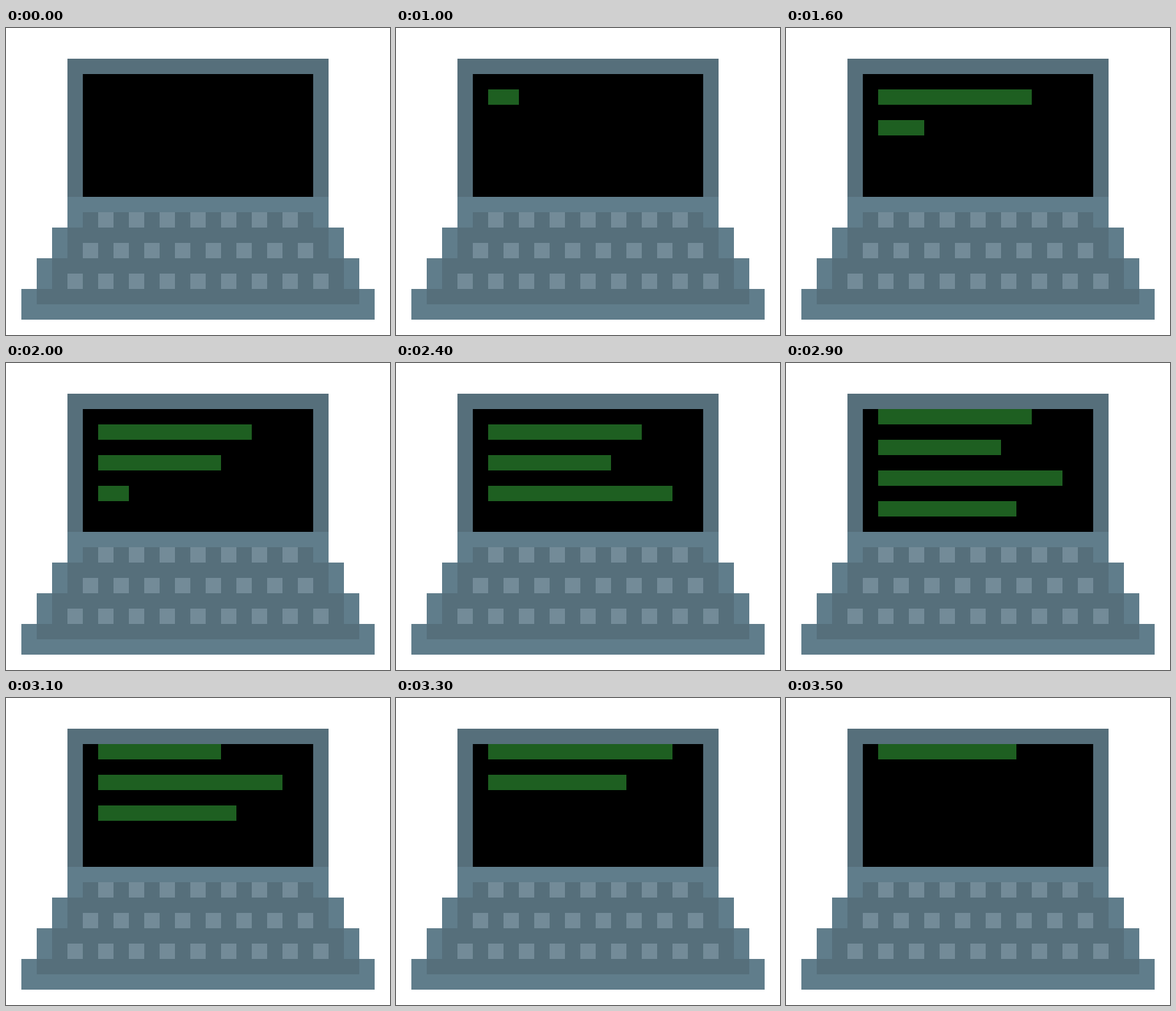
These frames come from a looping animation (575 by 460 pixels, 3.6 s). An HTML page with a canvas:

```html
<!DOCTYPE html>
<html lang="en">
<head>
<meta charset="utf-8">
<title>Typing laptop</title>
<style>
  html, body { margin: 0; width: 100%; height: 100%; overflow: hidden; background: #fff; }
  canvas { display: block; }
</style>
</head>
<body>
<canvas id="stage" width="575" height="460"></canvas>
<script>
const CELL = 23, LOOP = 3600, TICK = 100, TYPING_START = 1000;
const STEPS_PER_LINE = 5;
const LINES = [10, 8, 12, 9];
const FRAME = '#566f7b', BASE = '#607d8b', KEY = '#738b98', TEXT = '#1e5f21';

const ctx = document.getElementById('stage').getContext('2d');

// All coordinates are in cells.
function box(color, x, y, w, h) {
  ctx.fillStyle = color;
  ctx.fillRect(x * CELL, y * CELL, w * CELL, h * CELL);
}

function drawLaptop() {
  box(FRAME, 4, 2, 17, 9);
  for (let tier = 0; tier < 4; tier++) {
    const y = 11 + 2 * tier, x = 4 - tier, w = 17 + 2 * tier;
    box(BASE, x, y, w, 2);
    if (tier === 0) box(FRAME, 5, 12, 15, 1);
    else box(FRAME, x + 1, y, w - 2, tier === 3 ? 1 : 2);
  }
  for (let row = 0; row < 3; row++) {
    for (let i = 0; i < 7 + row; i++) box(KEY, 6 - row + 2 * i, 12 + 2 * row, 1, 1);
  }
}

function drawScreen(step) {
  box('#000', 5, 3, 15, 8);
  const scroll = Math.max(0, step - LINES.length * STEPS_PER_LINE + 1);
  LINES.forEach((length, i) => {
    const typed = Math.min(1, Math.max(0, step / STEPS_PER_LINE - i));
    const y = 4 + 2 * i - scroll;
    if (y >= 3) box(TEXT, 6, y, Math.round(length * typed), 1);
  });
}

function render(now) {
  const t = now % LOOP;
  const step = Math.max(0, Math.floor((t - TYPING_START) / TICK) + 1);
  ctx.clearRect(0, 0, 575, 460);
  drawLaptop();
  drawScreen(step);
}

const start = performance.now();
function loop() {
  render(performance.now() - start);
  requestAnimationFrame(loop);
}
loop();
</script>
</body>
</html>
```
